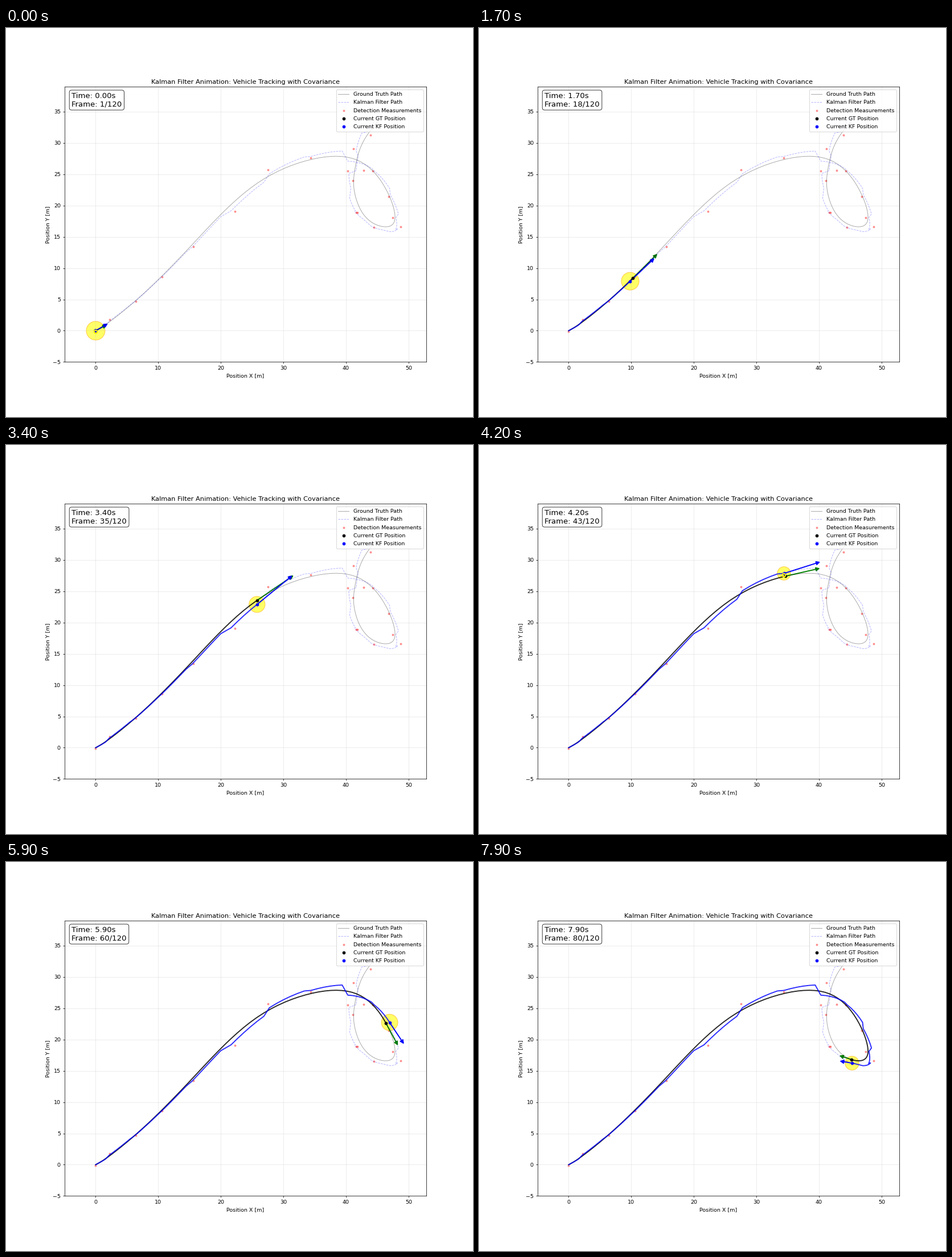
A matplotlib script that plays this animation: 820 px wide and 683 px high, repeating every 8 s.

```python
import numpy as np
import matplotlib.pyplot as plt
from matplotlib.animation import FuncAnimation
from matplotlib.patches import Circle, FancyArrowPatch

DPI = 820 / 12
STEPS, SHOWN, DT = 120, 80, 0.1
CYCLE = 6    # steps between detections
LAG = 1.4    # steps by which the filter's velocity trails the vehicle
GAIN = 0.5   # share of each detection error that is corrected
HEAD = 0.4   # arrow head, added to half a second of travel


def spline(t, y):
    """Natural cubic spline through the points y at times t."""
    n, h = len(t), np.diff(t)[:, None]
    slope = np.diff(y, axis=0) / h
    a, r = np.eye(n), np.zeros_like(y)
    for i in range(1, n - 1):
        a[i, i - 1:i + 2] = h[i - 1, 0], 2 * (h[i - 1, 0] + h[i, 0]), h[i, 0]
        r[i] = 6 * (slope[i] - slope[i - 1])
    m = np.linalg.solve(a, r)

    def at(q):
        q = np.asarray(q, float)
        k = np.clip(np.searchsorted(t, q, side="right") - 1, 0, n - 2)
        u, v = (q - t[k])[:, None], (t[k + 1] - q)[:, None]
        return ((m[k] * v**3 + m[k + 1] * u**3) / (6 * h[k])
                + (y[k] / h[k] - m[k] * h[k] / 6) * v
                + (y[k + 1] / h[k] - m[k + 1] * h[k] / 6) * u)
    return at


# Vehicle: step, x, y at a few key moments
keys = np.array([
    (0, 0, 0), (5, 1.85, 1.15), (9, 4.5, 3.2), (24, 15.8, 14.15),
    (34, 25.8, 23.55), (42, 34.6, 27.4), (50, 41.7, 27.3), (59, 46.4, 22.6),
    (67, 47.84, 18.1), (73, 47.0, 16.7), (79, 45.2, 16.8), (91, 42.1, 19.8),
    (98, 41.25, 23.0), (105, 41.5, 26.2), (112, 42.7, 30.1),
    (119, 45.5, 33.96)])
place = spline(keys[:, 0], keys[:, 1:])

hits = np.array([
    (-.05, -.1), (2.25, 1.8), (6.4, 4.7), (10.6, 8.6), (15.65, 13.4),
    (22.3, 19.1), (27.55, 25.7), (34.4, 27.6), (40.3, 25.5), (44.3, 25.55),
    (46.8, 21.4), (47.45, 18.1), (48.7, 16.6), (44.5, 16.5), (41.65, 18.9),
    (41.85, 18.85), (41.1, 23.95), (42.8, 25.6), (41.15, 29.05),
    (43.9, 31.3)])

steps = np.arange(STEPS)
truth = place(steps)
truth_move = place(steps + .5) - place(steps - .5)

# Filter: carry on with the lagging velocity, correct at every detection
kf_move = place(steps - LAG) - place(steps - LAG - 1)
kf = np.zeros_like(truth)
for i in steps[1:]:
    kf[i] = kf[i - 1] + kf_move[i]
    if i % CYCLE == 0:
        kf[i] += GAIN * (hits[i // CYCLE] - kf[i])


def arrow_vectors(move):
    size = np.hypot(*move.T)[:, None]
    return move * (.5 / DT + HEAD / size)


truth_vec, kf_vec = arrow_vectors(truth_move), arrow_vectors(kf_move)

fig, ax = plt.subplots(figsize=(820.01 / DPI, 683.01 / DPI), dpi=DPI)
ax.set_aspect("equal")
ax.set(xlim=(-5, 52.84), ylim=(-5, 38.96),
       xticks=range(0, 51, 10), yticks=range(-5, 36, 5),
       xlabel="Position X [m]", ylabel="Position Y [m]",
       title="Kalman Filter Animation: Vehicle Tracking with Covariance")
ax.grid(alpha=.3)

ax.plot(*truth.T, "k-", lw=1, alpha=.35, label="Ground Truth Path")
ax.plot(*kf.T, "b--", lw=1, alpha=.3, label="Kalman Filter Path")
ax.scatter(*hits.T, s=10, c="red", alpha=.35, label="Detection Measurements")
truth_line, = ax.plot([], [], "k-", lw=2, alpha=.8)
kf_line, = ax.plot([], [], "b-", lw=2, alpha=.8)
truth_dot, = ax.plot([], [], "ko", ms=5, label="Current GT Position")
kf_dot, = ax.plot([], [], "bo", ms=5, label="Current KF Position")
hit_ring, = ax.plot([], [], "o", ms=6, mfc="none", mec="yellow", mew=2)
spread = ax.add_patch(Circle((0, 0), 1, fc="yellow", ec="orange", alpha=.6))


def add_arrow(color):
    return ax.add_patch(FancyArrowPatch(
        (0, 0), (1, 1), arrowstyle="-|>", mutation_scale=14, color=color,
        lw=2, shrinkA=0, shrinkB=0))


truth_arrow, kf_arrow = add_arrow("green"), add_arrow("blue")
ax.legend(loc="upper right", labelspacing=.56)
info = ax.text(.02, .98, "", transform=ax.transAxes, va="top", fontsize=14,
               linespacing=1.1,
               bbox=dict(boxstyle="round", fc="white", alpha=.8))


def update(i):
    k, since = divmod(i, CYCLE)
    truth_line.set_data(*truth[:i + 1].T)
    kf_line.set_data(*kf[:i + 1].T)
    truth_dot.set_data(*truth[i:i + 1].T)
    kf_dot.set_data(*kf[i:i + 1].T)
    hit_ring.set_data(*hits[k:k + 1].T)
    hit_ring.set_visible(since == 0)
    spread.center = tuple(kf[i])
    spread.radius = 1.06 + .05 * since + .44 * np.exp(-i / 12)
    truth_arrow.set_positions(truth[i], truth[i] + truth_vec[i])
    kf_arrow.set_positions(kf[i], kf[i] + kf_vec[i])
    info.set_text(f"Time: {i * DT:.2f}s\nFrame: {i + 1}/{STEPS}")
    return ()


anim = FuncAnimation(fig, update, frames=SHOWN, interval=100, repeat=True,
                     repeat_delay=0, init_func=lambda: update(0))
plt.show()
```
